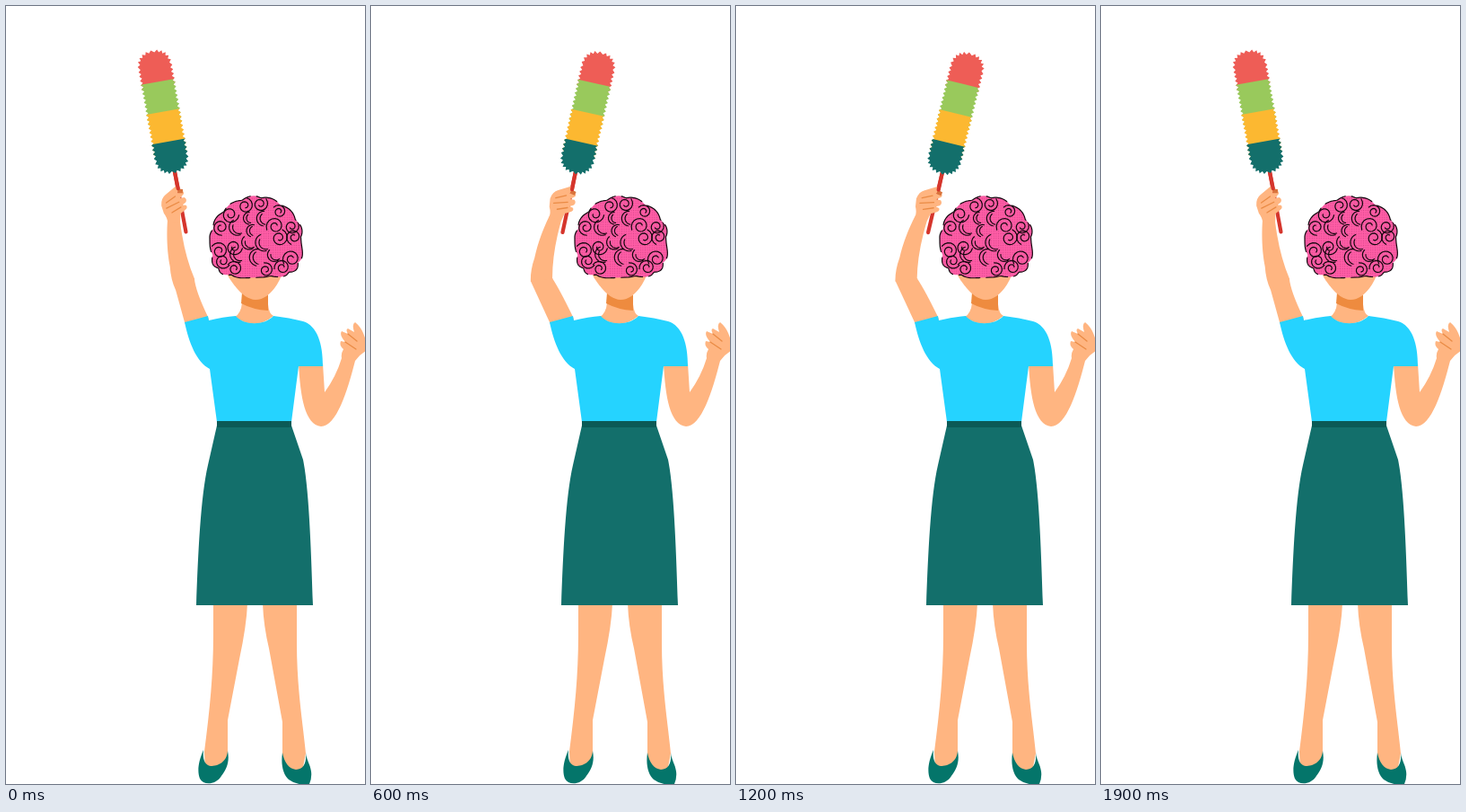
An HTML page that plays this animation: 400x866 px, repeating every 2 s.

```html
<!DOCTYPE html>
<html lang="en">
<head>
<meta charset="utf-8">
<title>Duster</title>
<style>
  html, body { margin: 0; width: 100%; height: 100%; overflow: hidden; background: #fff; }
  svg { display: block; width: 100%; height: 100%; }
  .skin { fill: #ffb581; }
  .teal { fill: #136f6b; }
  .shoe { fill: #04756a; }
  .shirt { fill: #25d3ff; }
  .fold { fill: none; stroke: #ea8b45; stroke-width: 1.3; stroke-linecap: round; }
  .stick { stroke: #d5352c; stroke-width: 4.2; stroke-linecap: round; }
  .ink { fill: none; stroke: #12060d; stroke-width: 1.2; stroke-linecap: round; }
</style>
</head>
<body>
<svg viewBox="0 0 400 866">
  <defs>
    <pattern id="dots" width="2.6" height="2.6" patternUnits="userSpaceOnUse">
      <rect width="2.6" height="2.6" fill="#ff5da6"/>
      <circle cx="1.3" cy="1.3" r=".62" fill="#d9468b"/>
    </pattern>
    <clipPath id="fluff"><path id="teeth"/></clipPath>
    <clipPath id="trim"><path id="dome"/></clipPath>
  </defs>

  <!-- legs and shoes -->
  <path class="skin" d="M231 665H269Q268 690 260 727L247 795V835L240 850H222L221 830C226 790 231 750 231 700Z"/>
  <path class="skin" d="M286 665H324V710C324 760 331 800 334 832L330 852H312L308 835V797L293 715Q287 690 286 665Z"/>
  <path class="shoe" d="M220 828C214 842 213 852 216 860C220 868 234 867 240 857C247 848 249 840 247 829C246 842 236 846 228 846C221 845 219 838 220 828Z"/>
  <path class="shoe" d="M308 831C306 845 309 856 315 861Q324 868 338 866Q341 859 340 852C339 844 335 840 334 831C335 842 332 850 323 850C315 849 310 842 308 831Z"/>

  <!-- resting arm -->
  <path class="skin" d="M326 398H353L355 430Q368 412 374 392Q373 387 376 382Q371 378 373 373L378 374Q371 366 374 362L381 365Q378 360 381 359L388 363Q385 354 389 352Q395 357 398 364L401 372V384Q394 388 389 395C380 430 368 468 351 468C333 466 328 435 326 398Z"/>
  <path class="fold" d="M378 374L390 382M381 365L391 373"/>

  <!-- raised arm -->
  <path class="skin" id="upper"/>
  <g id="fore">
    <path class="skin" d="M189 236C184 255 182 272 182 285Q180 300 183 312L206 304Q200 275 203 238Z"/>
    <path class="stick" d="M208 180L207 251"/>
    <path class="skin" d="M186 217Q187 209 193 206L206 199Q210 198 210 202L206 207L211 205Q214 206 213 209L208 213H213Q216 216 213 219L209 221L213 222Q215 225 211 227L205 230L203 239L189 237Q190 232 187 226Z"/>
    <path class="fold" d="M192 215L203 210M191 221L206 217M196 227L207 223"/>
    <path d="M207 202L213 204L212 208L207 207Z" fill="#d9743c"/>
    <path class="stick" d="M208 183V202"/>
    <g transform="rotate(1.3 208.5 115)"><g id="bands" clip-path="url(#fluff)"></g></g>
  </g>

  <!-- neck and face -->
  <path class="skin" d="M263 310V330Q262 342 255 346Q277 362 298 345Q293 343 292 332V310Z"/>
  <path d="M263 319L292 322V339Q275 338 262 331Z" fill="#ee8b3f"/>
  <path class="skin" d="M243 285Q244 298 253 309Q266 327 278 327Q291 327 302 310Q309 299 310 285Z"/>

  <!-- clothes -->
  <path class="shirt" d="M199 352L225 345L226 350Q242 346 256 345C265 356 288 356 298 345Q316 347 331 351C347 356 353 376 353 401H326L318 463H235L227 404C212 396 204 375 199 352Z"/>
  <path class="teal" d="M235 467H318L331 505C338 540 340 610 342 667H212C214 610 217 545 225 511Z"/>
  <rect x="235" y="462" width="83" height="7" fill="#0b5a56"/>

  <g id="hair"></g>
</svg>

<script>
const NS = 'http://www.w3.org/2000/svg';
const TAU = Math.PI * 2;
const $ = id => document.getElementById(id);
const add = (parent, tag, attrs) => {
  const el = document.createElementNS(NS, tag);
  for (const k in attrs) el.setAttribute(k, attrs[k]);
  return parent.appendChild(el);
};
// Path through n + 1 samples of f over 0..1.
const plot = (n, f) => 'M' + Array.from({ length: n + 1 },
  (_, i) => f(i / n, i).map(v => v.toFixed(2)).join(' ')).join('L');
const pow = (v, e) => Math.sign(v) * Math.abs(v) ** e;

// Duster head: a capsule walked in equal steps, every other point pushed out.
function serrated(cx, cy, half, r, teeth) {
  const side = 2 * (half - r), lap = side + Math.PI * r;
  return plot(teeth * 2, (k, i) => {
    const far = k >= 0.5, s = k * 2 * lap - (far ? lap : 0);
    const q = r + (i % 2 ? 1.7 : -1.1), a = Math.max(0, s - side) / r;
    const x = q * pow(Math.cos(a), 0.85);
    const y = side / 2 - Math.min(s, side) - q * pow(Math.sin(a), 0.85);
    return far ? [cx - x, cy - y] : [cx + x, cy + y];
  });
}
$('teeth').setAttribute('d', serrated(208.5, 115, 68, 17.7, 64));
['#ee5d56', '#99c95c', '#fcb831', '#136f6b'].forEach((fill, i) =>
  add($('bands'), 'rect', { x: 185, y: i ? 47.5 + 33.7 * i : 40, width: 47, height: 48, fill }));

// Hair: a scalloped dome, squarer below, covered in rings of curls.
const hair = $('hair');
const domePoint = (turn, size) => {
  const a = turn * TAU, c = Math.cos(a), s = Math.sin(a), e = s > 0 ? 0.55 : 1.08;
  return [279 + 51 * size * pow(c, e), 257 + 45 * size * pow(s, e)];
};
const dome = plot(180, k => domePoint(k, 0.97 + 0.05 * Math.abs(Math.sin(k * TAU * 6.5))));
$('dome').setAttribute('d', dome);
add(hair, 'path', { d: dome, fill: 'url(#dots)' });
add(hair, 'path', { d: dome, class: 'ink', 'stroke-dasharray': '24 7' });
const curls = add(hair, 'g', { 'clip-path': 'url(#trim)' });

let seed = 11;
const random = () => (seed = seed * 16807 % 2147483647) / 2147483647;

function curl([x, y], r, start, turns, shrink) {
  const d = plot(24, k => {
    const a = (start + turns * k) * TAU, q = r * (1 - shrink * k);
    return [x + q * Math.cos(a), y + q * Math.sin(a)];
  });
  add(curls, 'path', { d, class: 'ink' });
}
function ring(count, size, drawCurl) {
  for (let i = 0; i < count; i++) drawCurl(domePoint((i + random() * 0.3) / count, size), i);
}
const spiral = at => curl(at, 7.5 + 3 * random(), random(), 1.5, 0.75);
const lock = at => {
  const r = 7 + 3 * random(), start = 0.1 + 0.25 * random();
  curl(at, r, start, 0.48, 0.1);
  curl([at[0] + 2, at[1]], r * 0.8, start, 0.36, 0.1);
};
ring(13, 0.82, spiral);
ring(9, 0.5, (at, i) => (i % 4 ? lock : spiral)(at));
ring(3, 0.18, lock);

const PIVOT = [205.5, 284];
const turn = (x, y, deg) => {
  const a = deg * TAU / 360, c = Math.cos(a), s = Math.sin(a), dx = x - PIVOT[0], dy = y - PIVOT[1];
  return [PIVOT[0] + dx * c - dy * s, PIVOT[1] + dx * s + dy * c];
};

// Constant-speed swing: 900 ms right, 1000 ms back, short rest; 10 poses a second.
function draw(ms) {
  const t = Math.floor(ms % 2000 / 100) * 100;
  const k = t <= 900 ? t / 900 : Math.max(0, (1900 - t) / 1000);
  const deg = -11.4 + 34.1 * k;
  $('fore').setAttribute('transform', `rotate(${deg} ${PIVOT})`);
  const elbow = turn(183, 311.5, deg), inner = turn(206, 303.5, deg), mid = turn(194, 298, deg);
  $('upper').setAttribute('d', `M${mid}L${elbow}L199 352L204 362L228 356L225 346Q211 317 ${inner}Z`);
}

const begin = performance.now();
function tick() {
  draw(performance.now() - begin);
  requestAnimationFrame(tick);
}
draw(0);
requestAnimationFrame(tick);
</script>
</body>
</html>
```
